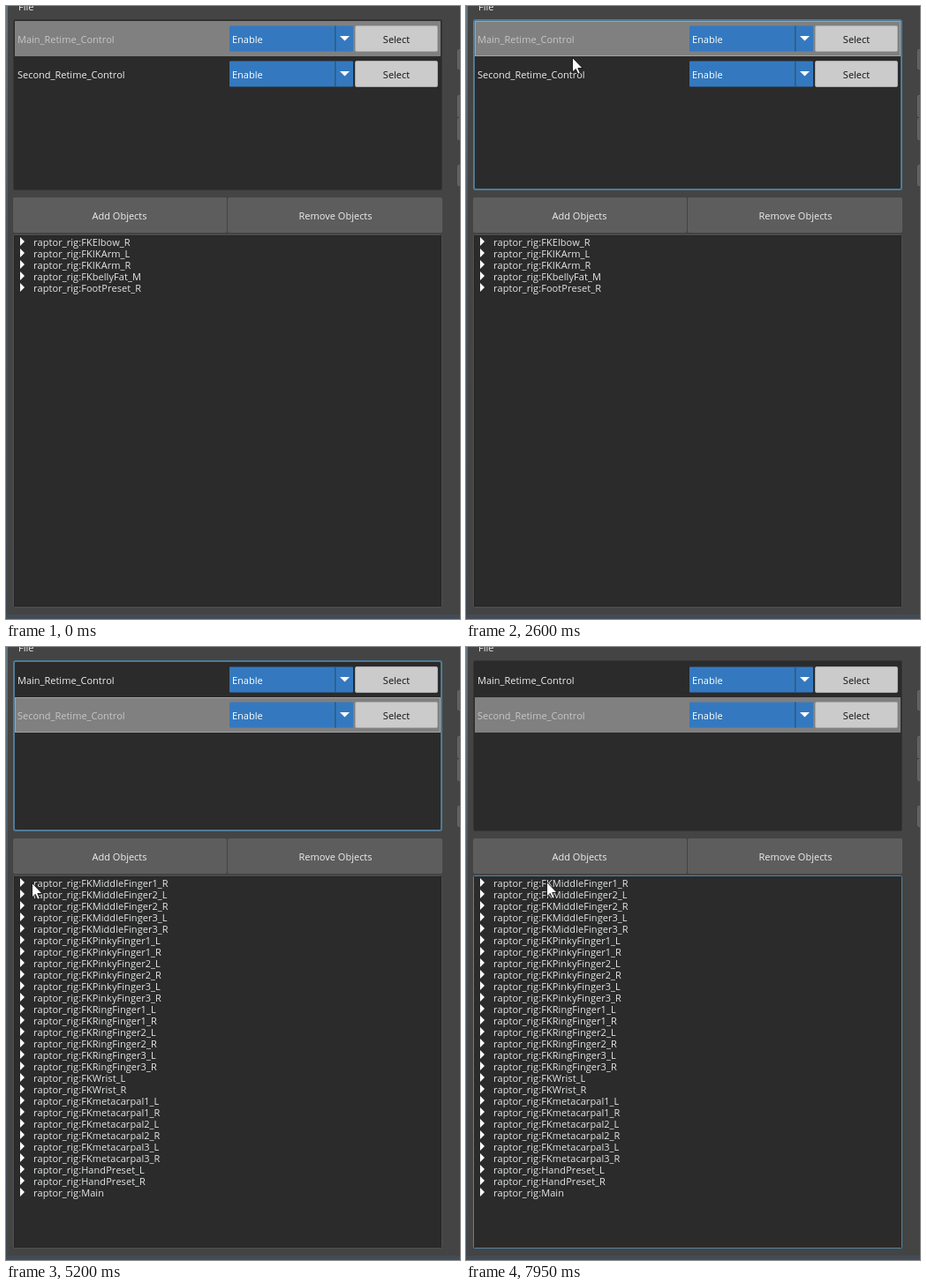
Recreate the animation shown at these times as an HTML page. Size 514 px wide and 695 px high, loop 8 s.

```html
<!DOCTYPE html>
<html lang="en">
<head>
<meta charset="utf-8">
<title>Retime controls</title>
<style>
html, body { margin: 0; width: 100%; height: 100%; overflow: hidden; background: #444; }
svg { display: block; width: 514px; height: 695px; }
text { font: 11px "Open Sans", "Noto Sans", sans-serif; font-kerning: none; fill: #eee; white-space: pre; }
#tree text { fill: #e4e8e5; letter-spacing: .06px; }
.mid { text-anchor: middle; }
</style>
</head>
<body>
<svg viewBox="0 0 514 695">
  <defs>
    <clipPath id="treeClip"><rect x="9" y="260" width="484" height="420"/></clipPath>
    <linearGradient id="edge" x2="0" y2="1">
      <stop offset="0" stop-color="#667580"/>
      <stop offset=".4" stop-color="#465560"/>
      <stop offset="1" stop-color="#3c4856"/>
    </linearGradient>
  </defs>
  <rect width="514" height="695" fill="#444"/>
  <rect width="2" height="695" fill="url(#edge)"/>
  <rect y="690" width="514" height="5" fill="#434c57"/>
  <g id="side"></g>
  <text x="14" y="5">File</text>
  <g id="panel"></g>
  <g id="buttons"></g>
  <g id="tree"></g>
  <circle id="halo" r="12" fill="#b8ae20" opacity=".9"/>
  <path id="cursor" d="M.5 .5V17L4.3 13.4 6.8 19.2 9.3 18.1 6.8 12.5H12Z" fill="#fff" stroke="#111" stroke-width=".9"/>
</svg>
<script>
const LOOP = 8000;
const $ = id => document.getElementById(id);

const rect = (x, y, w, h, fill, more = "") =>
  `<rect x="${x}" y="${y}" width="${w}" height="${h}" fill="${fill}" ${more}/>`;
const text = (x, y, s, more = "") => `<text x="${x}" y="${y}" ${more}>${s}</text>`;
const shape = (d, fill = "#fff") => `<path d="${d}" fill="${fill}"/>`;

// Row names
const rig = s => "raptor_rig:" + s;
const sides = s => [s + "_L", s + "_R"];
const joints = s => [1, 2, 3].flatMap(n => sides(s + n));
const mainItems = ["FKElbow_R", "FKIKArm_L", "FKIKArm_R", "FKbellyFat_M", "FootPreset_R"].map(rig);
const addedItems = [
  ...joints("FKMiddleFinger").slice(1), ...joints("FKPinkyFinger"), ...joints("FKRingFinger"),
  ...sides("FKWrist"), ...joints("FKmetacarpal"), ...sides("HandPreset"), "Main"
].map(rig);
const channels = [
  ...["rotate", "scale", "translate"].flatMap(c => ["X", "Y", "Z"].map(a => c + a)), "visibility"
];

// Pointer glides: start, end, steps, x, y
const origin = [353, 854];
const glides = [
  [370, 770, 6, 136, 63],
  [930, 1090, 3, 124, 76],
  [1490, 1650, 3, 128, 45],
  [1730, 1890, 3, 128, 40],
  [2520, 2760, 4, 117, 64],
  [3620, 3620, 1, 118, 70],
  [3700, 3860, 3, 150, 261],
  [4020, 4180, 3, 144, 228],
  [5030, 5270, 4, 21, 270],
  [5430, 5500, 2, 19, 263],
  [5810, 6290, 7, 36, 284],
  [6450, 6450, 1, 36, 282],
  [7160, 7160, 1, 36, 276],
  [7240, 7640, 6, 17, 266],
  [7880, 7950, 2, 91, 266]
];
const clicks = [
  [1170, 1330], [2050, 2210], [2840, 3000], [4260, 4410],
  [5660, 5810], [6610, 6690], [7720, 7880]
];

function pointer(t) {
  let [x, y] = origin;
  for (const [t0, t1, n, tx, ty] of glides) {
    if (t < t0) break;
    const span = t1 - t0 || 1;
    const k = Math.min(n, Math.floor((t - t0) / span * (n - 1) + 0.01) + 1);
    const p = 1 - (1 - k / n) ** 2;
    x += (tx - x) * p;
    y += (ty - y) * p;
  }
  return [x, y];
}

function controlRow(i, name, picked, focused) {
  const y = 17 + 40 * i;
  let s = "";
  if (picked) {
    s += rect(10, y, 482, 40, "#808080");
    if (focused) s += rect(10.5, y + .5, 481, 39, "none", 'stroke="#c4c4c4" stroke-dasharray="1 1"');
  }
  s += text(13, y + 25, name, picked ? 'style="fill:#c6c6c6"' : "");
  s += rect(253, y + 5.5, 140, 29, "#3479bf", 'rx="1"') + rect(372, y + 5.5, 1.5, 29, "#2c5a88");
  s += text(256, y + 25, "Enable", 'style="fill:#fff"') + shape(`M378 ${y + 17}h11l-5.500 5.500z`);
  s += rect(395.5, y + 5.5, 93, 29, "#cbcbcb", 'rx="1.5" stroke="#aaa"');
  return s + text(442, y + 25, "Select", 'class="mid" style="fill:#111"');
}

function drawPanel(picked, focused) {
  const frame = focused
    ? rect(9, 16, 484, 192, "#2b2b2b", 'rx="2" stroke="#507a96" stroke-width="2"')
    : rect(8.5, 15.5, 485, 193, "#2b2b2b", 'rx="2" stroke="#363636"');
  $("panel").innerHTML = frame +
    ["Main_Retime_Control", "Second_Retime_Control"]
      .map((name, i) => controlRow(i, name, i === picked, focused)).join("");
}

function drawButtons(state) {
  const fill = { idle: "#5d5d5d", hover: "#707070", down: "#2b2b2b" }[state];
  const button = (x, w, f, label, cx) =>
    rect(x + .5, 217.5, w - 1, 39, f, 'rx="1" stroke="#666" stroke-opacity=".6"') +
    text(cx, 242, label, 'class="mid"');
  $("buttons").innerHTML =
    button(8, 242, fill, "Add Objects", 128.5) +
    button(251, 243, "#5d5d5d", "Remove Objects", 373);
}

function treeRows(list, depth) {
  const rows = [];
  const add = (label, level, open) => rows.push({ label, level, open });
  list.forEach((label, i) => {
    const open = depth > 0 && i === 0;
    add(label, 0, open);
    if (!open) return;
    channels.forEach((c, j) => {
      const wide = depth > 1 && j === 0;
      add(c, 1, wide);
      if (wide) add("FKMiddleFinger1_R_" + c, 2);
    });
  });
  return rows;
}

function drawTree(list, depth, focused) {
  let s = rect(8.5, 259.5, 485, 422, "#2b2b2b", `rx="1" stroke="${focused ? "#5285a6" : "#505050"}"`);
  if (!focused) s += rect(9.5, 260.5, 483, 420, "none", 'stroke="#252525"');
  s += '<g clip-path="url(#treeClip)">';
  treeRows(list, depth).forEach(({ label, level, open }, i) => {
    const x = 16 + 20 * level, y = 267 + 13 * i;
    if (level < 2) s += shape(open ? `M${x - 3} ${y - 2}h10l-5 5z` : `M${x} ${y - 5}v10l5-5z`);
    s += text(x + 15, y + 5, label);
  });
  s += "</g>";
  if (depth) {
    s += rect(480, 261, 12, 419, "#2b2b2b");
    s += rect(480.5, 274.5, 10, depth > 1 ? 321 : 329, "#5d5d5d", 'rx="1.5"');
    s += shape("M481 270h9l-4.500-5z", "#b8b8b8") + shape("M481 671h9l-4.500 5z", "#b8b8b8");
  }
  $("tree").innerHTML = s;
}

// Redraw a part only when its state differs
const drawn = {};
function update(name, draw, ...args) {
  const key = args.join();
  if (drawn[name] === key) return;
  drawn[name] = key;
  draw(...args);
}

function render(t) {
  const [x, y] = pointer(t);
  const place = `translate(${Math.round(x)} ${Math.round(y)})`;
  $("cursor").setAttribute("transform", place);
  $("halo").setAttribute("transform", place);
  $("cursor").style.display = t < 370 ? "none" : "";
  const pressed = clicks.some(([a, b]) => t >= a && t < b);
  $("halo").style.display = pressed ? "" : "none";

  const picked = t < 1170 || (t >= 2050 && t < 2840) ? 0 : 1;
  const inTree = t >= 5660;
  const over = x >= 8 && x < 250 && y >= 217 && y < 257;
  const depth = t < 5660 || t >= 7720 ? 0 : t < 6610 ? 1 : 2;
  const list = picked === 0 ? "main" : t >= 4640 ? "added" : "none";

  update("panel", drawPanel, picked, t >= 1170 && !inTree);
  update("buttons", drawButtons, !over ? "idle" : pressed ? "down" : "hover");
  update("tree", (name, d, f) => drawTree({ main: mainItems, added: addedItems, none: [] }[name], d, f),
    list, depth, inTree);
}

$("side").innerHTML = [[49, 23], [101, 25], [127, 25], [180, 24]]
  .map(([y, h]) => rect(511.5, y + .5, 6, h - 1, "#5d5d5d", 'rx="1" stroke="#6a6a6a"')).join("");

function tick() {
  render(performance.now() % LOOP);
  requestAnimationFrame(tick);
}
tick();
</script>
</body>
</html>
```
